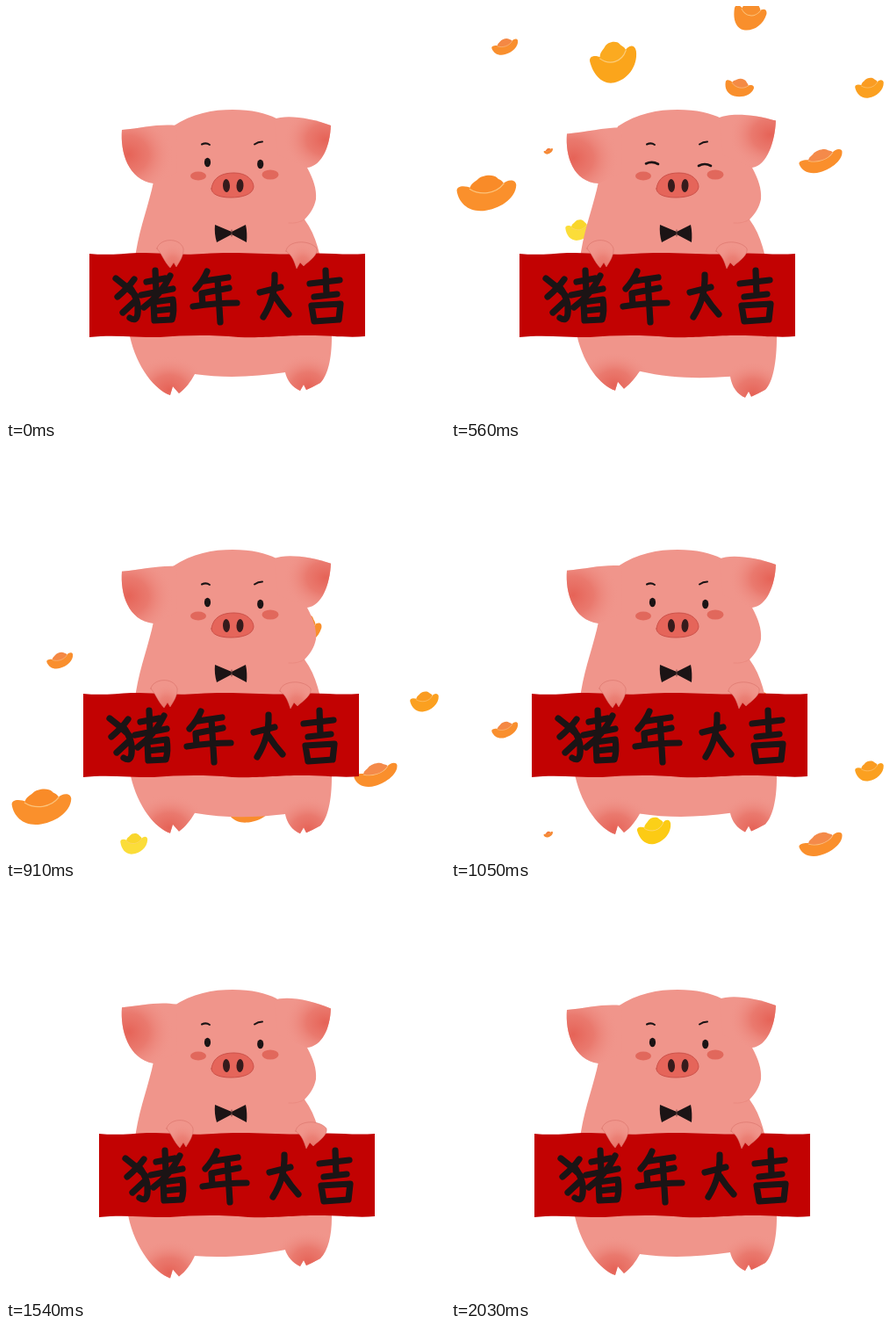
An HTML page with a canvas for the animation above (2100 ms loop, 500 px wide and 469 px high).

```html
<!DOCTYPE html>
<html lang="zh">
<head>
<meta charset="utf-8">
<title>猪年大吉</title>
<style>
html, body { margin: 0; width: 100%; height: 100%; overflow: hidden; background: #fff; }
canvas { display: block; width: 500px; height: 469px; }
</style>
</head>
<body>
<canvas id="stage" width="500" height="469"></canvas>
<script>
const ctx = document.getElementById('stage').getContext('2d');
const LOOP = 2100, STEP = 70, FALL = 0.565;
const PINK = '#f0958b', RED = '#e5655a', INK = '#1b1415';

// Banner sway: [time, offset]
const SWAY = [[0, 0], [560, -17], [1540, 11], [2030, 0], [2100, 0]];

// x, y at 280 ms, width, height, tilt in degrees, body colour, dome colour
const INGOTS = [
  [41, 55, 68, 39, -5, '#fa902c', '#f98b28'],
  [111, 7, 11, 6, -18, '#f58a35', '#f47c3a'],
  [232, 3, 39, 29, -12, '#fccb14', '#fbd018'],
  [278, 54, 58, 37, -2, '#f98d2d', '#f4884a'],
  [146, 97, 31, 23, -4, '#fbdd39', '#f9d62c'],
  [422, 18, 51, 24, -16, '#fa8f2c', '#f48a4a'],
  [62, -112, 31, 17, -16, '#f98f2e', '#f48844'],
  [186, -94, 54, 45, -12, '#fba51b', '#fbaa20'],
  [340, -147, 37, 34, 12, '#f98f2c', '#f78f2e'],
  [328, -65, 33, 21, 15, '#f98f2c', '#f48a44'],
  [477, -65, 33, 22, -9, '#fba020', '#fa9c22']
];

// Ingot drawn in a box of 68 by 42
const BOAT = new Path2D('M-34-6C-34-13-24-12-17-8C-8 0 10-1 18-9C24-15 34-15 34-7C32 10 12 21-6 21C-23 21-33 9-34-6Z');
const DOME = new Path2D('M-19-7C-18-14-12-15-9-18C-4-23 9-23 13-18C15-15 20-14 20-9C11 3-8 3-19-7Z');
const SEAM = new Path2D('M-19-7C-8 2 10 2 20-10');

const LETTERS = new Path2D([
  'M125 310Q136 318 147 329M146 311Q139 321 127 331M140 319Q152 334 150 350Q149 360 141 355M147 336L133 349',
  'M160 314L181 310M170 301L171 325M154 329L190 322M187 307Q177 328 157 343',
  'M168 337L190 334Q192 347 189 357L169 358ZM169 347L188 345',
  'M229 302Q225 312 216 322M226 313L253 309M223 327L254 321M223 328L224 340M213 342Q238 338 263 338M241 311L244 360',
  'M289 326L313 320M306 306Q307 332 293 354M306 330Q313 341 322 351',
  'M346 316L380 312M364 301L365 328M351 331L377 328M348 341L381 339L379 357L351 359Z'
].join(''));

const BANNER = new Path2D('M95 282C115 284 132 282 150 281C180 281 198 284 225 282C270 279 300 284 340 282C365 280 382 284 409 282L409 376C390 378 370 375 345 375C312 375 300 378 265 377C230 374 202 375 175 377C145 377 120 374 95 377Z');
const SNOUT = new Path2D('M234 208C236 194 247 190 260 190C275 190 282 199 282 206C281 215 268 218 256 218C242 218 234 214 234 208Z');
const TIE = new Path2D('M238 249L257 257L273 249Q275 258 274 269L257 260L240 269Q237 259 238 249Z');
const HANDS = [
  ['M172 276C174 265 197 262 202 276C203 284 197 292 194 297L191 292L187 298C180 291 178 283 172 276Z', 187],
  ['M319 279C320 267 345 265 354 276C356 284 343 292 339 296L335 292L331 299C328 290 326 284 319 279Z', 335]
].map(([d, x]) => [new Path2D(d), x]);

function swayAt(t) {
  const i = SWAY.findIndex(([end]) => t < end);
  const [t0, a] = SWAY[i - 1], [t1, b] = SWAY[i];
  return a + (b - a) * (t - t0) / (t1 - t0);
}

function fill(path, color) {
  ctx.fillStyle = color;
  ctx.fill(path);
}

function stroke(path, color, width) {
  ctx.strokeStyle = color;
  ctx.lineWidth = width;
  ctx.stroke(path);
}

function oval(x, y, rx, ry, color, tilt = 0) {
  const p = new Path2D();
  p.ellipse(x, y, rx, ry, tilt, 0, Math.PI * 2);
  fill(p, color);
}

// Soft red tint kept inside a shape
function blush(path, x, y, rx, ry, alpha = 0.95) {
  ctx.save();
  ctx.clip(path);
  ctx.translate(x, y);
  ctx.scale(rx, ry);
  const g = ctx.createRadialGradient(0, 0, 0, 0, 0, 1);
  g.addColorStop(0, `rgba(229,96,84,${alpha})`);
  g.addColorStop(0.45, `rgba(230,104,92,${alpha * 0.65})`);
  g.addColorStop(1, 'rgba(240,149,139,0)');
  ctx.fillStyle = g;
  ctx.fillRect(-1, -1, 2, 2);
  ctx.restore();
}

function drawIngot([x, y, w, h, tilt, body, dome], t) {
  ctx.save();
  ctx.translate(x, y + FALL * (t - 280));
  ctx.rotate(tilt * Math.PI / 180);
  ctx.scale(w / 68, h / 42);
  fill(BOAT, body);
  fill(DOME, dome);
  stroke(SEAM, 'rgba(253,214,150,.75)', 1.3);
  ctx.restore();
}

function drawBody(dx) {
  const l = dx * 0.31, r = -dx * 0.46;
  const earL = -dx * 0.26, earR = dx * 0.32;

  const left = new Path2D(`M194 ${136 + earL / 2}C172 ${134 + earL} 156 ${139 + earL} 132 ${141 + earL}C130 ${166 + earL} 139 ${198 + earL / 2} 168 202L195 190Z`);
  const right = new Path2D(`M305 ${129 + earR * 0.3}C318 ${123 + earR * 0.4} 347 ${127 + earR * 0.6} 370 ${136 + earR}C369 ${159 + earR} 360 182 343 184L310 170Z`);
  const body = new Path2D(`M190 137C212 122 236 118 258 118C280 118 296 122 308 128C325 145 340 165 343 184C350 197 354 208 353 220C351 230 346 237 340 243C354 262 358 284 363 310C368 335 371 355 371 378C371 ${400 + r / 2} 367 ${420 + r} 358 ${429 + r}Q349 ${434 + r} 342 ${437 + r}L339 ${431 + r}L335 ${438 + r}C326 ${434 + r} 320 ${426 + r} 318 ${417 + r * 0.6}C285 ${422 + r * 0.3} 250 424 215 ${419 + l * 0.6}C210 ${428 + l} 205 ${435 + l} 197 ${441 + l}L190 ${433 + l}L187 ${443 + l}C170 ${437 + l} ${149 - l / 2} ${412 + l / 2} ${141 - l / 2} 376C141 345 143 315 148 280C153 250 163 225 168 200Z`);

  fill(body, PINK);
  fill(left, PINK);
  blush(left, 139, 169 + earL, 52, 48);
  fill(right, PINK);
  blush(right, 364, 152 + earR, 48, 40);
  blush(body, 186, 437 + l, 46, 38);
  blush(body, 344, 434 + r, 42, 38);
  stroke(new Path2D('M340 243Q332 248 322 247'), 'rgba(224,120,110,.35)', 1);
}

function drawFace(closed) {
  stroke(new Path2D('M223 157.5Q228 155 232 158M283 157.5Q287 154.5 292 154.5'), INK, 2);
  if (closed) {
    stroke(new Path2D('M222 179.5Q229 176 236 180M282 182Q289 178 296 182'), INK, 2.6);
  } else {
    oval(229.5, 178, 3.6, 5.2, INK);
    oval(289.7, 180, 3.6, 5.2, INK);
  }
  oval(219, 193.5, 9, 5, '#e1685c');
  oval(301, 192, 9.5, 5.5, '#e1685c');
  fill(SNOUT, RED);
  stroke(SNOUT, '#cc5149', 1);
  oval(251, 204.5, 4, 7.5, '#361b1c', -0.06);
  oval(266.5, 204.5, 4, 7.5, '#361b1c', 0.06);
  fill(TIE, INK);
  stroke(new Path2D('M257 255L257 262'), '#6b4440', 1);
}

function drawBanner(dx) {
  ctx.save();
  ctx.translate(dx, 0);
  fill(BANNER, '#c20202');
  stroke(LETTERS, INK, 7.2);
  for (const [hand, x] of HANDS) {
    fill(hand, PINK);
    blush(hand, x + 3, 297, 20, 26, 0.7);
    stroke(hand, 'rgba(208,104,96,.6)', 0.8);
  }
  ctx.restore();
}

function draw(now) {
  const t = Math.floor((now % LOOP) / STEP) * STEP;
  const dx = swayAt(t);
  ctx.fillStyle = '#fff';
  ctx.fillRect(0, 0, 500, 469);
  ctx.lineCap = ctx.lineJoin = 'round';
  INGOTS.forEach(ingot => drawIngot(ingot, t));
  drawBody(dx);
  drawFace(t >= 420 && t < 770);
  drawBanner(dx);
}

const start = performance.now();
function tick() {
  draw(performance.now() - start);
  requestAnimationFrame(tick);
}
tick();
</script>
</body>
</html>
```
